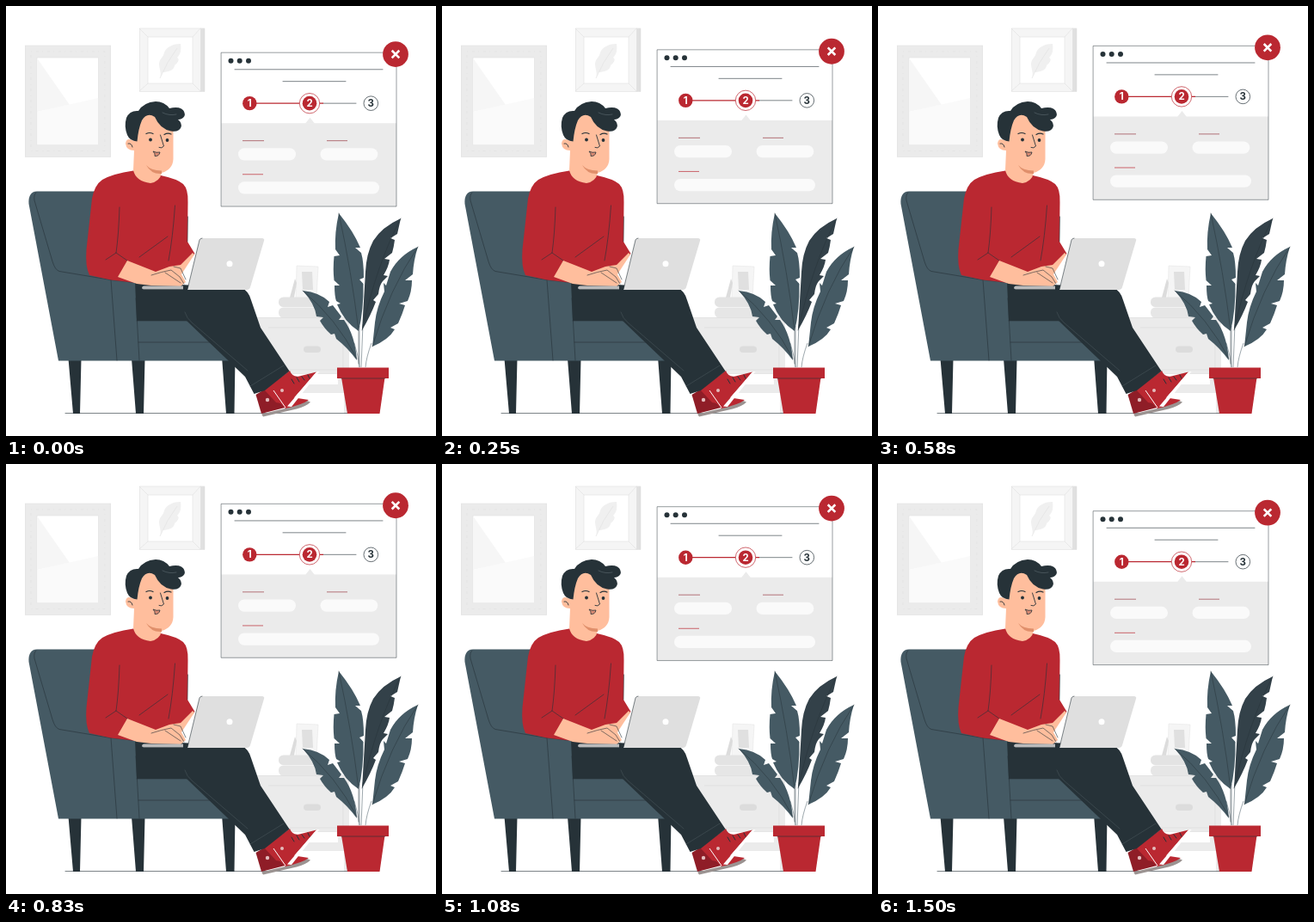
These frames come from a looping animation (500x500 px, 1.54 s). An HTML page:

```html
<!DOCTYPE html>
<html lang="en">
<head>
<meta charset="utf-8">
<title>Filling in a form</title>
<style>
  html, body { margin: 0; width: 100%; height: 100%; overflow: hidden; background: #fff; }
  svg { display: block; width: 100vw; height: 100vh; }
  text { font: 700 11.500px Inter, "Open Sans", sans-serif; text-anchor: middle; }
  .ink { fill: none; stroke: #263238; stroke-width: .6; stroke-linecap: round; stroke-linejoin: round; }
  .red { fill: #ba2831; }
  .dark { fill: #263238; }
  .slate { fill: #455a64; }
  .skin { fill: #ffbe9d; }
  .pale { fill: #ebebeb; }
</style>
</head>
<body>
<svg viewBox="0 0 500 500">
  <rect width="500" height="500" fill="#fff"/>

  <!-- wall frames -->
  <g stroke="#e0e0e0" stroke-width=".6">
    <rect x="22.300" y="46" width="99.400" height="129.500" fill="#ebebeb"/>
    <rect x="29" y="53" width="86" height="115.500" fill="none" stroke-dasharray="1 5 3 4"/>
    <rect x="36" y="60" width="71.500" height="101.500" fill="#fff"/>
    <path d="M36.300 61 74 115 36.300 123Z" fill="#f6f6f6" stroke="none"/>
    <path d="M36.300 123 107.200 107V161.200H36.300Z" fill="#fafafa" stroke="none"/>
    <path d="M226 26H231V99.500H226Z" fill="#e0e0e0"/>
    <rect x="155.300" y="26" width="71" height="73.500" fill="#f5f5f5"/>
    <path d="M155 26 165 36M226 26 217 36M155 99 165 90M226 99 217 90" fill="none"/>
    <rect x="165" y="36" width="52" height="54" fill="#fff"/>
    <path d="M179 84C181 77 178 73 178 67C179 60 183 60 184 54C187 47 195 44 203 44C204 51 203 56 199 60C203 62 199 67 196 69C196 75 187 77 182 77Z" fill="#f0f0f0" stroke="none"/>
    <path d="M179 84Q187 65 199 49" fill="none"/>
  </g>

  <!-- bedside table -->
  <g>
    <path d="M338 302 363 303 361 340H337Z" fill="#f5f5f5" stroke="#e6e6e6" stroke-width=".6"/>
    <path d="M344 309H356L357 330H345Z" fill="#e0e0e0"/>
    <path d="M336 317 338 322 335 339H330Z" fill="#dcdcdc"/>
    <rect x="317" y="338.500" width="55" height="11.500" rx="5.500" fill="#e3e3e3"/>
    <rect x="317" y="350.500" width="57" height="12" rx="5.500" fill="#e6e6e6"/>
    <path class="pale" d="M291 362.500H399V427H291Z"/>
    <path class="pale" d="M386 427H399V474H393V450H340V440H386Z"/>
    <path d="M305 374H392V423H318M291 362.500H399M310 427.500H399" fill="none" stroke="#dcdcdc" stroke-width=".7"/>
    <rect x="346" y="395.500" width="20" height="7.500" rx="3.750" fill="#dcdcdc"/>
  </g>

  <path class="ink" d="M69 473.500H433"/>

  <!-- armchair -->
  <path class="dark" d="M72.500 410H87.500L86 474H78ZM146 410H161.500L160 474H151ZM251 408H266.500L265.500 474H256Z"/>
  <path class="slate" d="M36 215.500H120L160 322 215 350 264 400V412.500H61L26.500 230Q25.500 216 36 215.500Z"/>
  <path class="ink" d="M35 217Q32 219 33 226L54 297Q57 307 62 308.500L122 318.500 150 321.500M122 318.500 129 412M152 366H211L264 404M154 391H238M151 340 155 412"/>

  <!-- legs and shoes -->
  <path d="M297 474.500 325 468 350 459 354 460.500Q350 465 338 468.500L299 477.500Z" fill="#9b9391"/>
  <path d="M290.500 452 302 445 318 452 332 465 297 474Z" fill="#8f1d27"/>
  <path class="red" d="M316 459 326 454 352 458Q346 463 325 468Z"/>
  <path class="red" d="M300 446 330 424Q333 432 341 430.500L361 425.500 328 463.500 314 461Z"/>
  <path d="M361 425.500 364.500 425 332 466 327 465.500Z" fill="#fff"/>
  <path d="M311 447 325 467" fill="none" stroke="#fff" stroke-width="1"/>
  <circle cx="304" cy="458" r="2.200" fill="#e3bcbc"/>
  <circle cx="321" cy="447" r="2" fill="#e3bcbc"/>
  <path class="ink" d="M332 434 335 439M338 432 341 437M344 431 347 435M351 429 353 433" style="stroke-width:1"/>
  <path class="dark" d="M150 321 274 328Q282 331 285 342L296 374 329.500 424.500 301 447 288.500 451 278 431 210 366H152Z"/>
  <path class="ink" d="M208 356Q210 363 216 368L281 424M284 442 323 418" style="stroke:#47545a"/>

  <!-- torso -->
  <path class="red" d="M148 191.500Q124 195 112 202Q103 208 100 224L93.500 283Q92 303 97 313L122 318.500 160 323 205 304 219.500 288 211 274 211.500 228Q212 213 206 207Q199 201 180 197Z"/>
  <path class="ink" d="M132 234Q131 266 128 287L116 295M128 287 141 296M196.500 232Q194 269 189 296M155 292 188 268M211 274 211.500 245"/>
  <path class="skin" d="M141 296 130 315 152 323 169 325 203 326 209 321 204 312 219 289 217 287 203 301 190 303 174 309Z"/>
  <path class="ink" d="M169 313Q181 309 192 307L202 315 207 323M185 310 203 322M195 303 203 305 209 318"/>

  <!-- laptop -->
  <path d="M160 325.500H206V330H160Q156 327.500 160 325.500Z" fill="#b9babb"/>
  <path d="M228 270H298Q301 270.500 300 273L284 327Q283 330 280 330H211L225 272Q226 270 228 270Z" fill="#dfdfdf"/>
  <path class="ink" d="M158 329.500H211L225 272Q226 270 228 270"/>
  <circle cx="260" cy="299.800" r="3.500" fill="#fff"/>

  <!-- head -->
  <path class="skin" d="M150 145 149 157Q140 152 139 160Q140 168 149 168L148 191Q151 204 168 206Q179 204 181 194Q194 190 194.500 178V137L165 122Z"/>
  <path d="M163 185Q168 191 181 191.500L181 195Q169 196 163 185Z" fill="#e08f6b"/>
  <path class="dark" d="M152.500 157.500Q144 157 141 150Q137 140 140 130Q144 121 154 122Q160 112 174 111Q184 111 190 119Q199 117 204 119.500Q209 123 207.500 128Q205 132 200 132Q205 136 203.500 141Q201 147 192 145.500Q179 143 173 129Q164 123 158 133Q154 142 152.500 157.500Z"/>
  <path class="ink" d="M182 124Q190 128 198 126" style="stroke:#66747b;stroke-width:.5"/>
  <path class="ink" d="M163 148.500Q167 146.500 171 148.500M184 149.500Q188 147 192 149" style="stroke-width:1.200"/>
  <circle class="dark" cx="168" cy="155.500" r="1.900"/><circle class="dark" cx="187.500" cy="156" r="1.900"/>
  <path class="ink" d="M179.500 150 183.500 163Q181 166 178 164.500M142 160Q146 159 147 164" style="stroke-width:.9"/>
  <path d="M171 169Q175 171 179 170Q178 175 173 174.500Q174 172 171 169Z" fill="#d98a72" stroke="#263238" stroke-width=".8"/>

  <!-- plant -->
  <path d="M411 372V420M425 392Q419 408 418 420M405 392Q410 408 411 420M415 370 413 420" fill="none" stroke="#75838a" stroke-width=".7"/>
  <path class="dark" d="M459 247Q437 257 427 273Q419 288 418 309L414 377Q424 360 430 344L427 342 433 335Q434 325 438 320L444 314 439 313Q445 303 446 295L440 294 449 287Q451 280 452 272L447 270 455 265Z" style="fill:#334149"/>
  <path class="slate" d="M387 241Q382 263 383 283L388 290 381.500 291Q380 306 381.500 319L388 325 382 325Q382 337 384 343L389 346 385 347Q393 367 410 378Q416 354 415.500 323L411 318 416 316Q416 297 413 287L406 281 412 281Q404 262 387 241Z"/>
  <path class="slate" d="M479 280Q457 290 447 309L442 325 439 322 440 332Q431 350 429 368L426 396Q445 388 452 376L447 374 456 369Q461 358 464 348L457 346 467 343Q472 332 472 319L464 319 473 312Q474 295 479 280Z"/>
  <path class="slate" d="M345 331Q365 333 376 344L374 350 380 348L390 361 387 365 393 365Q406 383 408 412Q397 397 384 387L382 381 378 382Q370 375 365 366L369 362 361 361Q359 346 345 331Z"/>
  <path class="ink" d="M387 241Q402 310 410 378V416M459 247Q431 300 414 377M479 280Q446 328 426 396M345 331Q384 363 408 410" style="stroke-width:.5"/>
  <path class="red" d="M390 432H440.500L434.500 474H397Z"/>
  <rect class="red" x="385" y="420.500" width="60" height="12.500"/>
  <path class="ink" d="M390 433H440.500"/>

  <!-- form window -->
  <g id="form">
    <rect x="250.500" y="54.700" width="203.500" height="178.900" fill="#fff"/>
    <rect class="pale" x="250.500" y="136.800" width="203.500" height="96.800"/>
    <path class="pale" d="M348 137.300 353.500 130.300 359 137.300Z"/>
    <rect class="ink" x="250.500" y="54.700" width="203.500" height="178.900" stroke-opacity=".8"/>
    <g class="dark"><circle cx="261.500" cy="64.200" r="3"/><circle cx="271.700" cy="64.200" r="3"/><circle cx="282" cy="64.200" r="3"/></g>
    <path class="ink" d="M266 74.300H438M322 88.200H395M369 113.700H407"/>
    <path d="M291 113.700H342M364 113.700H369" fill="none" stroke="#ba2831" stroke-width="1.300"/>
    <circle class="red" cx="283.300" cy="113.700" r="8.200"/>
    <circle cx="353" cy="113.700" r="11.700" fill="#fff" stroke="#ba2831" stroke-width=".7"/>
    <circle class="red" cx="353" cy="113.700" r="8.300"/>
    <circle cx="424.300" cy="113.700" r="8.300" fill="#fff" stroke="#263238" stroke-width=".7"/>
    <text x="283.300" y="117.800" fill="#fff">1</text>
    <text x="353" y="117.800" fill="#fff">2</text>
    <text x="424.300" y="117.800" fill="#263238">3</text>
    <g fill="#fafafa">
      <rect x="270" y="165.800" width="67" height="14.300" rx="7.150"/>
      <rect x="365.500" y="165.800" width="66.800" height="14.300" rx="7.150"/>
      <rect x="270" y="204.800" width="164" height="14.300" rx="7.150"/>
    </g>
    <path d="M275 157.200H300M373 157.200H397" stroke="#9a3d45" stroke-width=".7"/>
    <path d="M275 196.300H299" stroke="#ba2831" stroke-width=".7"/>
    <circle class="red" cx="453" cy="56.600" r="14.900"/>
    <path d="M448.700 52.300 457.300 60.900M457.300 52.300 448.700 60.900" fill="none" stroke="#fff" stroke-width="2.600"/>
  </g>
</svg>
<script>
  const LOOP = 1540, HALF = 750, LIFT = 10, LEAD = 40, STEP = 1000 / 24;
  const form = document.getElementById('form');

  // The window rises and sinks at constant speed, 24 steps a second.
  function draw(ms) {
    const t = Math.floor((ms % LOOP + 4) / STEP) * STEP + LEAD;
    const rise = LIFT * Math.max(0, 1 - Math.abs(t / HALF - 1));
    form.setAttribute('transform', `translate(0 ${(-rise).toFixed(2)})`);
  }

  const start = performance.now();
  function tick() {
    draw(performance.now() - start);
    requestAnimationFrame(tick);
  }
  draw(0);
  requestAnimationFrame(tick);
</script>
</body>
</html>
```
